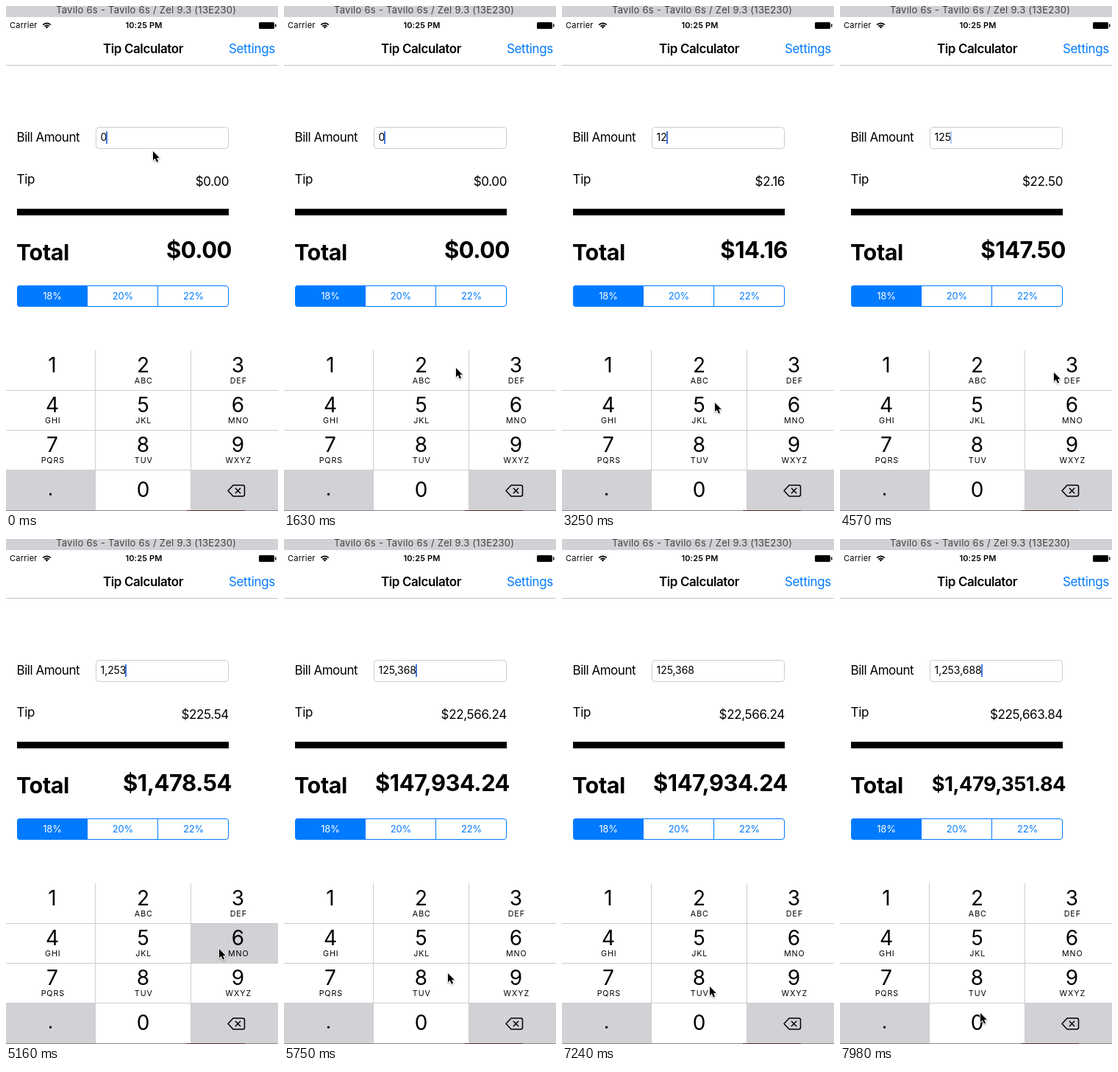
Write an HTML page with a canvas that moves like this. It is 370x685 px and loops after 8000 ms.

```html
<!DOCTYPE html>
<html lang="en">
<head>
<meta charset="utf-8">
<title>Tip Calculator</title>
<style>
html, body { margin: 0; width: 100%; height: 100%; overflow: hidden; background: #fff; }
canvas { display: block; width: 370px; height: 685px; }
</style>
</head>
<body>
<canvas id="stage" width="370" height="685"></canvas>
<script>
const ctx = document.getElementById('stage').getContext('2d');
const LOOP = 8000, STEP = 147.6, LEAD = 9;
const BLUE = '#007aff', KEY_GRAY = '#d0d2d6', LINE = '#cdcdcf';
const KEY_EDGES = [0, 122, 252, 370], KEY_CENTERS = [63, 186.5, 315.5], KEY_TOP = 468, KEY_H = 54;
const LETTERS = ['', 'ABC', 'DEF', 'GHI', 'JKL', 'MNO', 'PQRS', 'TUV', 'WXYZ'];

// Digits typed, and the tick at which each appears
const DIGITS = '1253688', TYPED = [13, 16, 28, 33, 36, 38, 52];

// Places where the pointer stops, with the tick of arrival
const TRAVEL = 4;
const STOPS = [
  { at: 0, x: 199, y: 196 }, { at: 6, x: 80, y: 488 }, { at: 11, x: 233, y: 490 },
  { at: 22, x: 207, y: 537 }, { at: 31, x: 290, y: 496 }, { at: 35, x: 289, y: 555 },
  { at: 38, x: 222, y: 588 }, { at: 45, x: 286, y: 603 }, { at: 49, x: 200, y: 606 },
  { at: 54, x: 190, y: 642 }
];

function rect(x, y, w, h, color) {
  ctx.fillStyle = color;
  ctx.fillRect(x, y, w, h);
}

function setFont(size, weight, space) {
  ctx.font = `${weight} ${size}px Inter, Roboto, sans-serif`;
  ctx.letterSpacing = space + 'px';
}

function text(str, x, y, size, { weight = 400, align = 'left', color = '#000', space = 0, fit = Infinity } = {}) {
  setFont(size, weight, space);
  const width = ctx.measureText(str).width;
  if (width > fit) setFont(size * fit / width, weight, space);
  ctx.textAlign = align;
  ctx.fillStyle = color;
  ctx.fillText(str, x, y);
  return width;
}

function stroke(color, width) {
  ctx.strokeStyle = color;
  ctx.lineWidth = width;
  ctx.stroke();
}

function roundPath(x, y, w, h, r) {
  ctx.beginPath();
  ctx.roundRect(x, y, w, h, r);
}

function poly(points) {
  ctx.beginPath();
  points.forEach(([x, y]) => ctx.lineTo(x, y));
  ctx.closePath();
}

function pointerAt(tick) {
  const i = Math.max(1, STOPS.findIndex(s => s.at >= tick));
  const from = STOPS[i - 1], to = STOPS[i];
  const leave = Math.max(from.at, to.at - TRAVEL);
  const k = Math.max(0, (tick - leave) / (to.at - leave));
  const ease = k * k * (3 - 2 * k);
  return [from.x + (to.x - from.x) * ease, from.y + (to.y - from.y) * ease];
}

// The blink restarts with each typed digit: on, a short fade, off
function caretAlpha(tick, count) {
  const since = tick - (count ? TYPED[count - 1] : -1);
  const phase = since % 6;
  return phase < 3 ? 1 : phase === 3 ? 0.4 : 0;
}

function money(v) {
  return '$' + v.toLocaleString('en-US', { minimumFractionDigits: 2, maximumFractionDigits: 2 });
}

function drawWifi(x, y) {
  const wedge = [-Math.PI * 0.76, -Math.PI * 0.24];
  for (const r of [4.2, 7.2]) {
    ctx.beginPath();
    ctx.arc(x, y, r, ...wedge);
    stroke('#000', 1.7);
  }
  ctx.beginPath();
  ctx.moveTo(x, y);
  ctx.arc(x, y, 2.5, ...wedge);
  ctx.fill();
}

function drawHeader() {
  rect(0, 0, 370, 15, '#d1d2d6');
  text('Tavilo 6s - Tavilo 6s / Zel 9.3 (13E230)', 68, 10, 13, { color: '#444', space: 0.27 });
  text('Carrier', 5, 30, 11, { space: 0.25 });
  drawWifi(55.5, 30.5);
  text('10:25 PM', 187.5, 30, 11, { weight: 600, align: 'center', space: 0.15 });
  roundPath(344, 22, 21, 9, 1.5);
  ctx.fill();
  rect(366, 24.5, 1.5, 4, '#000');
  text('Tip Calculator', 186.5, 64, 17, { weight: 600, align: 'center', space: -0.4 });
  text('Settings', 366, 64, 17, { align: 'right', color: BLUE, space: -0.3 });
  rect(0, 80, 370, 1, '#c4c4c6');
}

function drawForm(amount, caret) {
  text('Bill Amount', 14.5, 184, 17, { space: -0.47 });
  roundPath(122.5, 164.5, 180, 29, 4);
  stroke(LINE, 1);
  const w = text(amount.toLocaleString('en-US'), 128.5, 183, 14, { space: -0.05 });
  ctx.globalAlpha = caret;
  rect(Math.round(127.5 + w), 170, 2, 17, '#3f75d8');
  ctx.globalAlpha = 1;
  text('Tip', 14.5, 241, 17, { space: -0.3 });
  text(money(amount * 0.18), 303, 244, 17, { align: 'right', space: -0.35 });
  rect(15, 275, 288, 9, '#000');
  text('Total', 14, 345, 30.5, { weight: 700, space: -0.4 });
  text(money(amount * 1.18), 307, 342, 31, { weight: 700, align: 'right', space: -0.5, fit: 183 });
}

function drawTipRates() {
  ctx.save();
  roundPath(15, 379, 288, 29, 4);
  ctx.clip();
  rect(15, 379, 96, 29, BLUE);
  ctx.restore();
  roundPath(15.5, 379.5, 287, 28, 3.5);
  stroke(BLUE, 1);
  rect(206, 379, 1, 29, BLUE);
  ['18%', '20%', '22%'].forEach((s, i) =>
    text(s, 63 + i * 96, 398, 13, { align: 'center', color: i ? BLUE : '#fff', space: -0.2 }));
}

function drawKeys(lit) {
  for (let i = 0; i < 12; i++) {
    const c = i % 3, y = KEY_TOP + Math.floor(i / 3) * KEY_H;
    const left = KEY_EDGES[c], width = KEY_EDGES[c + 1] - left;
    if (i === 9 || i === 11 || i === lit - 1) rect(left, y, width, KEY_H, KEY_GRAY);
    if (i < 9) {
      text(i + 1, KEY_CENTERS[c], y + 29, 28, { align: 'center' });
      text(LETTERS[i], KEY_CENTERS[c] + 0.8, y + 44, 10.7, { align: 'center', space: 0.9 });
    }
    if (i % 3 === 0 && i) rect(0, y - 1, 370, 1, LINE);
  }
  for (const x of KEY_EDGES.slice(1, 3)) rect(x - 1, KEY_TOP - 1, 1, KEY_H * 4, LINE);
  text('.', 60.5, 664, 26, { align: 'center' });
  text('0', 186.5, 666, 28, { align: 'center' });
  drawBackspace(302, 650, 22.5, 15);
  rect(0, 684, 370, 1, '#8b8b8d');
  rect(246, 684, 79, 1, '#5d2a2c');
}

function drawBackspace(x, y, w, h) {
  const mid = y + h / 2, cx = x + w * 0.6, d = 3.2;
  ctx.lineJoin = ctx.lineCap = 'round';
  ctx.beginPath();
  ctx.moveTo(x, mid);
  ctx.lineTo(x + 7, y);
  ctx.arcTo(x + w, y, x + w, mid, 2.5);
  ctx.arcTo(x + w, y + h, x + 7, y + h, 2.5);
  ctx.lineTo(x + 7, y + h);
  ctx.closePath();
  for (const s of [-1, 1]) {
    ctx.moveTo(cx - d, mid - d * s);
    ctx.lineTo(cx + d, mid + d * s);
  }
  stroke('#000', 1.5);
  ctx.lineCap = 'butt';
}

function drawPointer(x, y) {
  ctx.save();
  ctx.translate(Math.round(x) + 1, Math.round(y) + 1);
  ctx.scale(0.88, 0.88);
  poly([[0, 0], [0, 14], [3.2, 11.2], [5.6, 16.6], [8, 15.6], [5.8, 10.2], [10, 10.2]]);
  ctx.shadowColor = 'rgba(0,0,0,0.35)';
  ctx.shadowBlur = 2;
  ctx.shadowOffsetY = 1;
  stroke('#fff', 2);
  ctx.shadowColor = 'transparent';
  ctx.fillStyle = '#000';
  ctx.fill();
  ctx.restore();
}

function draw(ms) {
  const tick = Math.min(54, Math.floor((ms % LOOP + LEAD) / STEP));
  const count = TYPED.filter(t => t <= tick).length;
  const amount = Number(DIGITS.slice(0, count));
  const press = TYPED.findIndex(t => tick === t - 1 || tick === t);
  rect(0, 0, 370, 685, '#fff');
  drawHeader();
  drawForm(amount, caretAlpha(tick, count));
  drawTipRates();
  drawKeys(press < 0 ? 0 : Number(DIGITS[press]));
  drawPointer(...pointerAt(tick));
}

const start = performance.now();
function loop() {
  draw(performance.now() - start);
  requestAnimationFrame(loop);
}
loop();
</script>
</body>
</html>
```
